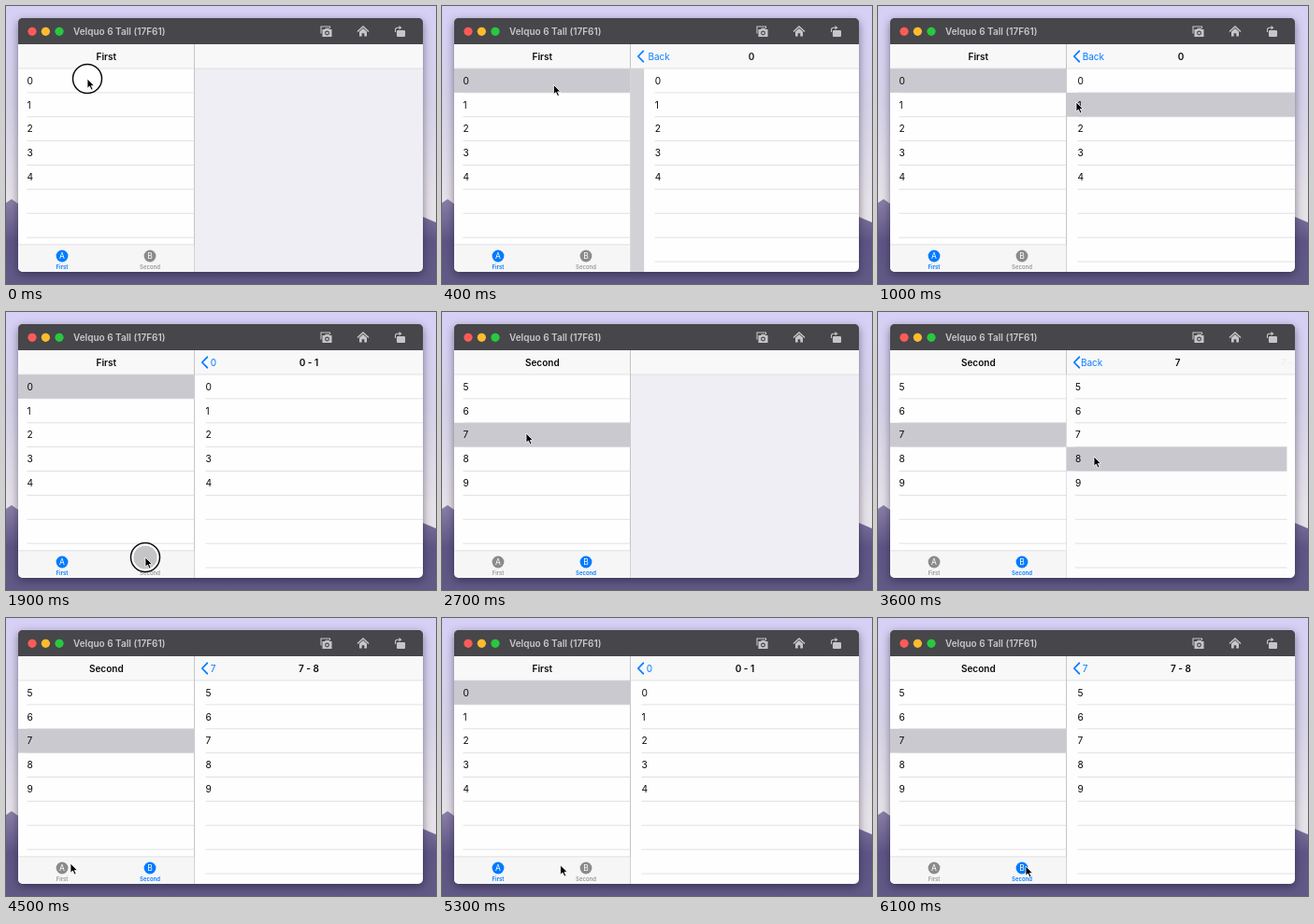
An HTML page for the animation above (6200 ms loop, 460x298 px).

```html
<!DOCTYPE html>
<html lang="en">
<head>
<meta charset="utf-8">
<title>Split view with tabs</title>
<style>
  html, body { margin: 0; width: 100%; height: 100%; overflow: hidden; }
  svg { display: block; width: 460px; height: 298px; }
  text { font: 400 10.2px Inter, "Open Sans", sans-serif; fill: #0a0a0a; }
  .title { font-size: 10px; font-weight: 600; text-anchor: middle; }
  .caption { font-size: 10px; font-weight: 600; fill: #c9c8cb; }
  .back { font-size: 10px; fill: #007aff; }
  .line { stroke: #d5d5d8; stroke-width: .7; }
  .pick { fill: #cac9cf; }
  .frame { filter: drop-shadow(0 3px 5px rgba(20, 15, 40, .5)); }
  .tab { fill: #8b8b8d; }
  .tab.on { fill: #007aff; }
  .tab text { text-anchor: middle; fill: #fff; font-size: 8.5px; }
  .tab .label { fill: inherit; font-size: 6px; font-weight: 500; }
  .tab.on .label { font-weight: 600; }
</style>
</head>
<body>
<svg viewBox="0 0 460 298">
  <defs>
    <linearGradient id="sky" x2="0" y2="1">
      <stop offset="0" stop-color="#d7d0f6"/>
      <stop offset=".35" stop-color="#d6d2e8"/>
      <stop offset=".7" stop-color="#e6e2e8"/>
    </linearGradient>
    <linearGradient id="hill" x2="0" y2="1">
      <stop offset="0" stop-color="#8a80a8"/>
      <stop offset=".5" stop-color="#5e5585"/>
      <stop offset="1" stop-color="#625a86"/>
    </linearGradient>
    <clipPath id="window"><rect x="13" y="13" width="433" height="272" rx="5"/></clipPath>
  </defs>

  <rect width="460" height="298" fill="url(#sky)"/>
  <path d="M0 211L6 207L13 212L120 240L330 245L446 226L453 229L460 232V298H0Z" fill="url(#hill)"/>
  <rect class="frame" x="13" y="13" width="433" height="272" rx="5" fill="#47464a"/>

  <g clip-path="url(#window)">
    <rect x="13" y="13" width="433" height="28" fill="#47464a"/>
    <circle cx="28" cy="27.3" r="4.6" fill="#fc5b57"/>
    <circle cx="42.4" cy="27.3" r="4.6" fill="#fdbc2e"/>
    <circle cx="57" cy="27.3" r="4.6" fill="#28c840"/>
    <text class="caption" x="72" y="31">Velquo 6 Tall (17F61)</text>
    <g fill="none" stroke="#c6c5c8" stroke-width="1.1">
      <path d="M337 29.5V22H346.5V24"/>
      <path d="M339 25.5H341.2L342.2 24.3H345L346 25.5H348V32.5H339Z" fill="#c6c5c8"/>
      <circle cx="343.5" cy="29" r="1.9" stroke="#47464a"/>
      <path d="M376 27.5L382 22L388 27.5" stroke-width="1.4"/>
      <path d="M378 27.5L382 24L386 27.5V32.5H383.3V29.3H380.7V32.5H378Z" fill="#c6c5c8" stroke="none"/>
      <rect x="418.5" y="26.5" width="8" height="6" rx=".8" fill="#c6c5c8"/>
      <path d="M416.5 28V25.5Q416.5 23.3 418.7 23.3H421"/>
      <path d="M420.5 21L423.5 23.3L420.5 25.6Z" fill="#c6c5c8" stroke="none"/>
    </g>

    <g id="bodies"></g>
    <rect x="202" y="41" width="244" height="26" fill="#f8f8f9"/>
    <path class="line" d="M202 67H446"/>
    <g id="bars"></g>
    <path id="chevron" d="M215.3 48.3L209.8 54L215.3 59.7" fill="none" stroke="#007aff"
          stroke-width="1.8" stroke-linecap="round" stroke-linejoin="round"/>

    <g id="masters"></g>
    <rect x="13" y="256" width="188.5" height="29" fill="#f6f6f7"/>
    <path class="line" d="M13 255.8H201"/>
    <g id="tabs"></g>
    <path class="line" d="M201.5 41V285"/>
  </g>

  <g id="press">
    <circle r="15.5" fill="#fff" stroke="#0b0b0b" stroke-width="1.5"/>
    <circle id="disc" r="12.6" fill="#c5c5c7"/>
  </g>
  <path id="cursor" d="M0 0V10.2L2.4 8L4.2 12L6 11.2L4.3 7.4H7.4Z"
        fill="#000" stroke="#fff" stroke-width=".8" stroke-linejoin="round"/>
</svg>

<script>
const LOOP = 6200, STEP = 100, ROW = 25.88, TOP = 67, PANE = 244;
const $ = id => document.getElementById(id);

function add(parent, markup) {
  parent.insertAdjacentHTML('beforeend', `<g>${markup}</g>`);
  return parent.lastElementChild;
}

const show = (el, on) => { el.style.display = on ? '' : 'none'; };

function place(el, x, opacity = 1) {
  show(el, opacity > 0);
  el.setAttribute('transform', `translate(${x.toFixed(2)} 0)`);
  el.setAttribute('opacity', Math.min(1, opacity).toFixed(3));
}

// Five numbered rows; one of them can be highlighted.
function list(left, width, inset, first, pick) {
  let out = `<rect x="${left}" y="${TOP}" width="${width}" height="218" fill="#fefefe"/>
    <rect class="pick" x="${left}" y="${TOP + pick * ROW}" width="${width}" height="${ROW}"/>`;
  for (let i = 0; i < 8; i++) {
    const y = TOP + i * ROW;
    if (i < 5) out += `<text x="${left + inset}" y="${y + 16.7}">${first + i}</text>`;
    out += `<path class="line" d="M${left + inset} ${y + ROW}H${left + width}"/>`;
  }
  return out;
}

function makeScreen(first, pick, title, back, travel) {
  const content = first === null
    ? `<rect x="202" y="${TOP}" width="${PANE}" height="218" fill="#efeef4"/>`
    : list(202, PANE, 11.5, first, pick);
  const body = add($('bodies'), content +
    `<rect class="dim" x="202" y="${TOP}" width="${PANE}" height="218" opacity="0"/>`);
  return {
    body, travel,
    dim: body.querySelector('.dim'),
    pick: body.querySelector('.pick'),
    title: add($('bars'), `<text class="title" x="324" y="57.6">${title}</text>`),
    back: add($('bars'), `<text class="back" x="218.7" y="57.6">${back}</text>`)
  };
}

function makeTab(name, letter, x, first, pick, pickAt, rowPick, rowPickAt, pushes) {
  const n = first + pick;
  const master = add($('masters'), list(13, 188.5, 9.5, first, pick) +
    `<rect x="13" y="41" width="188.5" height="26" fill="#f8f8f9"/>
     <path class="line" d="M13 67H201"/>
     <text class="title" x="107.3" y="57.6">${name}</text>`);
  const button = add($('tabs'), `<circle cx="${x}" cy="268" r="6.4"/>
    <text x="${x}" y="271.1">${letter}</text>
    <text class="label" x="${x}" y="282.3">${name}</text>`);
  button.classList.add('tab');
  return {
    master, button, pickAt, rowPickAt, pushes,
    pick: master.querySelector('.pick'),
    screens: [
      makeScreen(null, 0, '', '', 0),
      makeScreen(first, rowPick, n, 'Back', 30),
      makeScreen(first, -9, `${n} - ${first + rowPick}`, n, 100)
    ]
  };
}

const tabs = [
  makeTab('First', 'A', 60, 0, 0, 100, 1, 900, [150, 1000]),
  makeTab('Second', 'B', 154, 5, 2, 2600, 3, 3500, [2754, 3584])
];

// time, x, y of the pointer tip
const path = [
  [0, 87, 78], [200, 87, 78], [800, 212, 103], [1100, 212, 103],
  [1800, 149, 263], [2000, 149, 263], [2500, 90, 130], [2700, 90, 130],
  [3000, 101, 152], [3400, 231, 155], [3700, 231, 155], [4400, 69, 263],
  [5000, 69, 263], [5500, 158, 266], [LOOP, 158, 266]
];
const presses = [0, 900, 1900, 2600, 3500, 4600, 5700];
const switches = [2000, 4700, 5800];

function pointer(t) {
  const i = path.findIndex(k => k[0] > t);
  const [t0, x0, y0] = path[i - 1], [t1, x1, y1] = path[i];
  const u = (t - t0) / (t1 - t0), e = u * u * (3 - 2 * u);
  return [x0 + (x1 - x0) * e, y0 + (y1 - y0) * e];
}

// Critically damped spring, 0 to 1.
function spring(ms) {
  const s = Math.max(0, ms) * .01826;
  const p = 1 - (1 + s) * Math.exp(-s);
  return p > .997 ? 1 : p;
}

function drawScreens(tab, t) {
  const level = tab.pushes.filter(start => start <= t).length;
  const p = level ? spring(t - tab.pushes[level - 1]) : 1;
  tab.screens.forEach((s, i) => {
    const entering = i === level, leaving = i === level - 1 && p < 1;
    for (const el of [s.body, s.title, s.back]) show(el, entering || leaving);
    if (entering) {
      place(s.body, (1 - p) * PANE);
      place(s.title, (1 - p) * PANE / 2, p);
      place(s.back, (1 - p) * s.travel, p);
      s.dim.setAttribute('opacity', 0);
    } else if (leaving) {
      place(s.body, -.3 * p * PANE);
      place(s.title, -94 * p, 1 - 1.4 * p);
      place(s.back, -50 * p, 1 - 1.4 * p);
      s.dim.setAttribute('opacity', .13 * p);
    }
  });
  if (tab.screens[1].pick) show(tab.screens[1].pick, t >= tab.rowPickAt);
  $('chevron').setAttribute('opacity', level === 0 ? 0 : level === 1 ? p : 1);
}

function render(t) {
  const active = switches.filter(s => s <= t).length % 2;
  tabs.forEach((tab, i) => {
    const on = i === active;
    show(tab.master, on);
    tab.button.classList.toggle('on', on);
    show(tab.pick, t >= tab.pickAt);
    if (on) drawScreens(tab, t);
    else tab.screens.forEach(s => [s.body, s.title, s.back].forEach(el => show(el, false)));
  });

  const [x, y] = pointer(t), at = `translate(${x} ${y})`;
  $('cursor').setAttribute('transform', at);
  $('press').setAttribute('transform', at);
  show($('press'), presses.some(s => t >= s && t < s + STEP));
  show($('disc'), y > 256);
}

let last = -1;
const began = performance.now();
function tick() {
  const t = Math.floor((performance.now() - began) % LOOP / STEP) * STEP;
  if (t !== last) render(last = t);
  requestAnimationFrame(tick);
}
tick();
</script>
</body>
</html>
```
